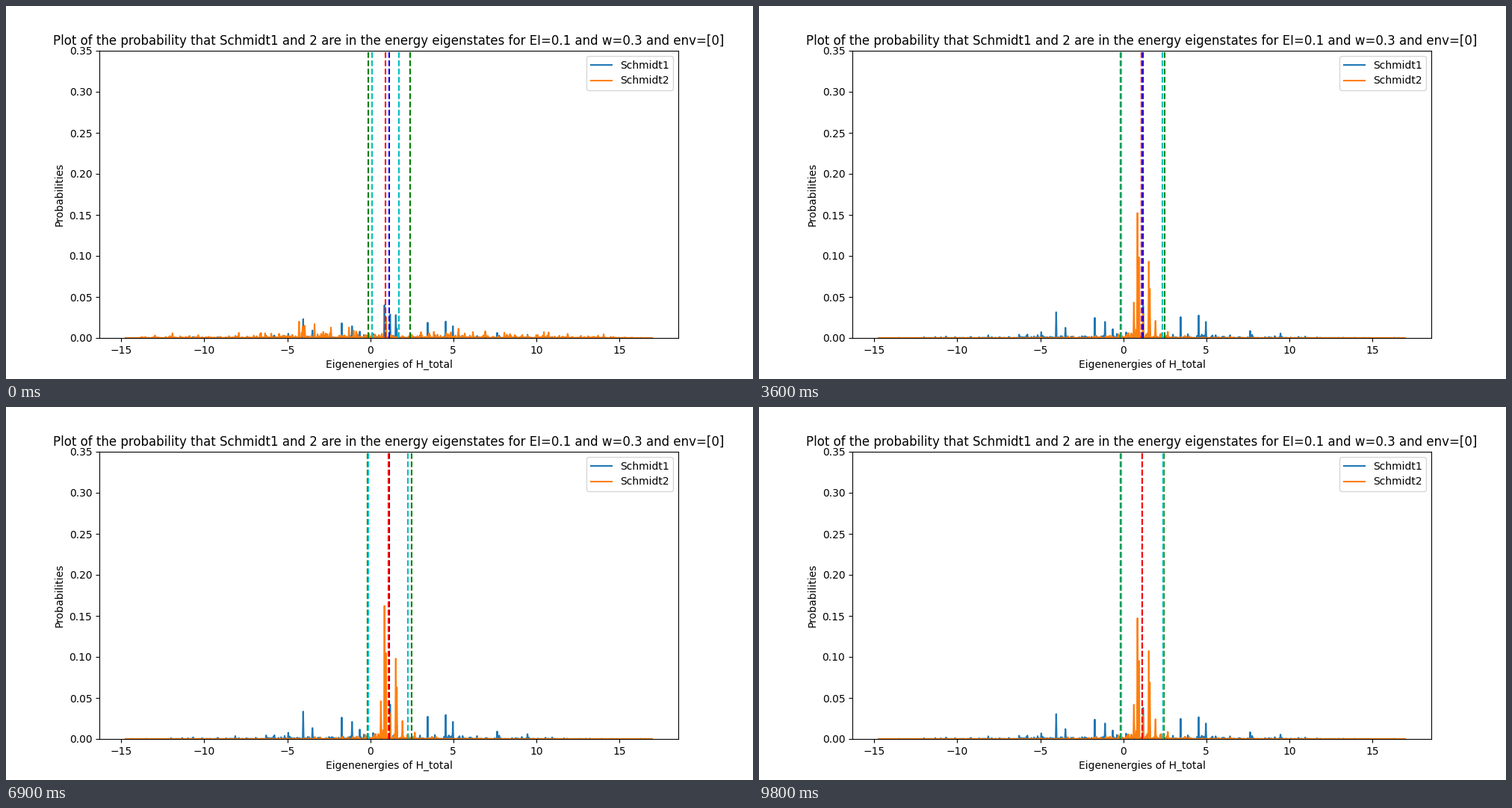
Recreate the animation shown at these times as a matplotlib script. Size 1000x500 px, loop 9900 ms.

```python
import numpy as np
import matplotlib.pyplot as plt
from matplotlib.animation import FuncAnimation

FRAMES, INTERVAL = 99, 100

# (energy, probability) of the few dominant eigenstates
WIDE_PEAKS = [(-4.05, .032), (-1.73, .025), (-1.1, .02), (1.2, .04),
              (3.45, .026), (4.53, .028), (4.97, .02)]
WIDE_START_PEAKS = [(.87, .04), (1.53, .028)]
NARROW_PEAKS = [(.65, .044), (.87, .155), (.95, .1), (1.2, .03),
                (1.53, .098), (1.61, .063), (1.95, .022)]
NARROW_START_PEAKS = [(-4.3, .02), (-3.35, .017), (.95, .025)]

rng = np.random.default_rng(7)
energy = np.linspace(-14.736, 16.973, 1024)
offset = abs(energy - 1)


def bell(width):
    return np.exp(-(offset / width) ** 2)


def noise(envelope, power):
    """Heavy-tailed random weights under an envelope."""
    return envelope * np.minimum(rng.exponential(size=energy.size) ** power, 35)


def add_peaks(weights, peaks):
    weights = weights.copy()
    for e, p in peaks:
        weights[np.argmin(abs(energy - e))] = p
    return weights


wide_end = add_peaks(noise(.0005 * bell(8), 2), WIDE_PEAKS)
wide_start = add_peaks(.72 * wide_end, WIDE_START_PEAKS)
narrow_end = add_peaks(noise(.003 * np.exp(-offset / .7) + .0003 * bell(5), 1.5),
                       NARROW_PEAKS)
narrow_start = add_peaks(noise(.0011 * bell(11) * (offset < 14.9), 1.5),
                         NARROW_START_PEAKS)


def relax(n, tau):
    return 1 - np.exp(-n / tau)


def wave(n, peak, period):
    return relax(n, 8) * np.cos(2 * np.pi * (n - peak) / period)


fig, ax = plt.subplots(figsize=(10, 5), dpi=100)
line1, = ax.plot(energy, wide_start, label="Schmidt1")
line2, = ax.plot(energy, narrow_start, label="Schmidt2")
ax.set_xlim(ax.get_xlim())
ax.set_ylim(0, .35)
ax.set_title("Plot of the probability that Schmidt1 and 2 are in the energy "
             "eigenstates for EI=0.1 and w=0.3 and env=[0]")
ax.set_xlabel("Eigenenergies of H_total")
ax.set_ylabel("Probabilities")
ax.legend(loc="upper right")
marks = [ax.axvline(1, color=c, linestyle="--") for c in "bggrcc"]


def update(n):
    mix, settle = relax(n, 3), relax(n, 8)
    slow, fast = wave(n, 46, 52), wave(n, 78, 36)

    wide = (1 - mix) * wide_start + mix * wide_end * (1 - .05 * slow)
    gain = np.where(energy < 1.3, 1 - .05 * slow, 1 - .1 * fast)
    line1.set_ydata(wide)
    line2.set_ydata((1 - mix) * narrow_start + mix * narrow_end * gain)

    # Mean energies with one spread to either side
    overshoot = (n / 11 * np.exp(1 - n / 11)) ** 2
    mean1 = .91 + .2 * settle + .025 * slow
    spread1 = .81 + .405 * settle + .03 * slow
    mean2 = 1.14 + .017 * settle + .022 * fast
    spread2 = 1.28 + .04 * settle + .03 * fast + .1 * overshoot
    places = (mean2, mean2 - spread2, mean2 + spread2,
              mean1, mean1 - spread1, mean1 + spread1)
    for mark, x in zip(marks, places):
        mark.set_xdata([x, x])
    return line1, line2, *marks


anim = FuncAnimation(fig, update, frames=FRAMES, interval=INTERVAL,
                     repeat=True, repeat_delay=0)
plt.show()
```
